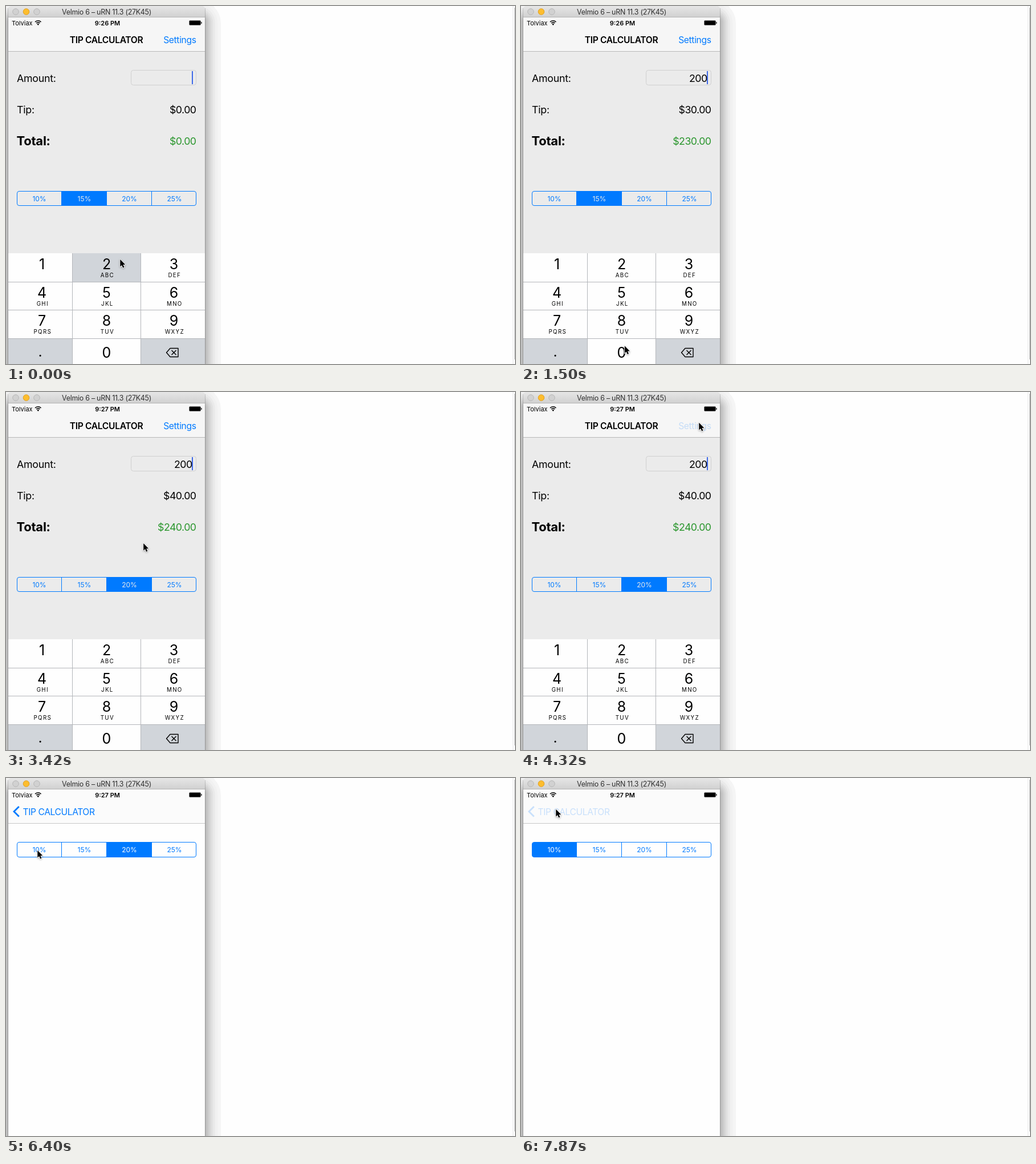
An HTML page with a canvas that plays this animation: 893 px wide and 627 px high, repeating every 8000 ms.

```html
<!DOCTYPE html>
<html lang="en">
<head>
<meta charset="utf-8">
<title>Tip calculator</title>
<style>
html, body { margin: 0; width: 100%; height: 100%; overflow: hidden; background: #fefefe; }
canvas { display: block; }
</style>
</head>
<body>
<canvas id="stage" width="893" height="627"></canvas>
<script>
const ctx = document.getElementById('stage').getContext('2d');
const LOOP = 8000, STEP = 147;
const LEFT = 4, RIGHT = 349, BLUE = '#007aff', KEY_GRAY = '#d1d5da', KEY_LINE = '#b4b6ba';
const FONT = 'Inter, "Liberation Sans", sans-serif';
const RATES = [10, 15, 20, 25];

// Pointer legs: start time, number of steps, destination.
const HOME = [199, 443];
const LEGS = [
  [150, 2, [179, 606]],
  [1500, 8, [215, 338]],
  [3270, 6, [311, 53]],
  [5660, 3, [296, 167]],
  [6100, 3, [54, 126]],
  [7290, 1, [59, 44]],
  [7580, 2, [60, 54]]
];

const between = (t, a, b) => t >= a && t < b;

function rect(x, y, w, h, color) {
  ctx.fillStyle = color;
  ctx.fillRect(x, y, w, h);
}

function roundRect(x, y, w, h, r) {
  ctx.beginPath();
  ctx.roundRect(x, y, w, h, r);
}

function text(str, x, y, size, { color = '#000', weight = 400, align = 'left', spacing = 0 } = {}) {
  ctx.font = `${weight} ${size}px ${FONT}`;
  ctx.letterSpacing = spacing + 'px';
  ctx.textAlign = align;
  ctx.fillStyle = color;
  ctx.fillText(str, x, y);
}

function polyline(points, close) {
  ctx.beginPath();
  points.forEach(([x, y]) => ctx.lineTo(x, y));
  if (close) ctx.closePath();
}

function pointerAt(t) {
  let pos = HOME;
  for (const [start, steps, goal] of LEGS) {
    if (t < start) break;
    const p = Math.min(steps, Math.floor((t - start) / STEP) + 1) / steps;
    const e = p * p * (3 - 2 * p);
    pos = pos.map((v, i) => v + (goal[i] - v) * e);
  }
  return pos;
}

function drawPointer([x, y]) {
  ctx.save();
  ctx.translate(x + 0.8, y + 0.3);
  ctx.lineJoin = 'round';
  polyline([[0.5, 0.5], [0.5, 13.3], [3.4, 10.7], [5.4, 15.3], [7.6, 14.3], [5.7, 9.8], [9.5, 9.8]], true);
  ctx.shadowColor = 'rgba(0,0,0,.35)';
  ctx.shadowBlur = 3;
  ctx.shadowOffsetY = 1;
  ctx.strokeStyle = '#fff';
  ctx.lineWidth = 1.7;
  ctx.stroke();
  ctx.shadowColor = 'transparent';
  ctx.fillStyle = '#000';
  ctx.fill();
  ctx.restore();
}

function drawDesktop() {
  rect(0, 0, 893, 627, '#fefefe');
  rect(889, 0, 1, 627, '#e8e8e8');
  rect(892, 3, 1, 616, '#b4b4b4');
  // Banded window shadow, narrower and darker towards the window.
  for (let d = 28; d > 0.5; d *= 0.8) {
    const gray = 254 - 9 - 65 * (1 - d / 28) ** 1.7;
    roundRect(LEFT - d, 18 - d, RIGHT - LEFT + 2 * d, 700, d + 12);
    ctx.fillStyle = `rgb(${gray},${gray},${gray})`;
    ctx.fill();
  }
  rect(LEFT - 1, 4, 1, 623, 'rgba(0,0,0,.16)');
  rect(RIGHT, 4, 1, 623, 'rgba(0,0,0,.16)');
}

function drawTitleBar() {
  const shade = ctx.createLinearGradient(0, 0, 0, 20);
  shade.addColorStop(0, '#e6e6e6');
  shade.addColorStop(1, '#d0d0d0');
  roundRect(LEFT, 0, RIGHT - LEFT, 20, [5, 5, 0, 0]);
  ctx.fillStyle = shade;
  ctx.fill();
  rect(LEFT, 19, RIGHT - LEFT, 1, '#b5b5b5');
  [[17, '#d1d1d1', '#b7b7b7'], [35.5, '#fdbd2e', '#dfa023'], [54, '#d1d1d1', '#b7b7b7']].forEach(([x, fill, edge]) => {
    ctx.beginPath();
    ctx.arc(x, 10, 5.3, 0, Math.PI * 2);
    ctx.fillStyle = fill;
    ctx.fill();
    ctx.strokeStyle = edge;
    ctx.lineWidth = 1;
    ctx.stroke();
  });
  text('Velmio 6 – uRN 11.3 (27K45)', 176.5, 14.7, 12.4, { color: '#303030', align: 'center', spacing: -0.25 });
}

function drawStatusBar(t) {
  text('Tolviax', 10, 33.5, 11);
  text(t < 1950 ? '9:26 PM' : '9:27 PM', 178, 33.5, 11, { weight: 600, align: 'center' });
  ctx.strokeStyle = '#000';
  ctx.lineWidth = 1.6;
  [4.2, 7.2].forEach(r => {
    ctx.beginPath();
    ctx.arc(56.3, 33, r, Math.PI * 1.24, Math.PI * 1.76);
    ctx.stroke();
  });
  ctx.fillStyle = '#000';
  ctx.beginPath();
  ctx.moveTo(56.3, 34);
  ctx.arc(56.3, 33.4, 2.4, Math.PI * 1.24, Math.PI * 1.76);
  ctx.fill();
  roundRect(321.5, 25.5, 20, 8, 1.5);
  ctx.strokeStyle = 'rgba(0,0,0,.55)';
  ctx.lineWidth = 1;
  ctx.stroke();
  rect(322, 26, 19, 7, '#000');
  roundRect(342.3, 27.8, 1.2, 3.4, 0.6);
  ctx.fill();
}

function drawSegments(x, y, h, selected, pressed, paper) {
  const w = 314, cell = 79;
  const divider = i => x - 1.5 + i * cell;
  ctx.save();
  roundRect(x, y, w, h, 3.5);
  ctx.clip();
  if (pressed >= 0) rect(divider(pressed), y, cell, h, 'rgba(0,122,255,.15)');
  rect(divider(selected), y, cell + 1, h, BLUE);
  for (let i = 1; i < 4; i++) rect(divider(i), y, 1, h, BLUE);
  ctx.restore();
  roundRect(x, y, w, h, 3.5);
  ctx.strokeStyle = BLUE;
  ctx.lineWidth = 1;
  ctx.stroke();
  RATES.forEach((rate, i) => text(rate + '%', x + 39 + i * cell, y + h / 2 + 4.6, 12,
    { color: i === selected ? paper : BLUE, align: 'center' }));
}

function drawKeypad(pressed) {
  const cols = [LEFT, 117, 237], widths = [112, 119, 112], tops = [433, 484, 533, 583], heights = [50, 48, 49, 44];
  const centers = [63, 176.5, 294.5], baselines = [461, 510.5, 560, 616];
  const letters = ['', 'ABC', 'DEF', 'GHI', 'JKL', 'MNO', 'PQRS', 'TUV', 'WXYZ'];
  rect(LEFT, 433, RIGHT - LEFT, 194, KEY_LINE);
  for (let i = 0; i < 12; i++) {
    const row = Math.floor(i / 3), col = i % 3;
    const label = i < 9 ? String(i + 1) : ['.', '0', ''][col];
    const gray = label === '.' || !label || label === pressed;
    rect(cols[col], tops[row], widths[col], heights[row], gray ? KEY_GRAY : '#fefefe');
    if (label === '.') text(label, 60, 614, 25, { align: 'center' });
    else text(label, centers[col], baselines[row], 25, { align: 'center' });
    if (letters[i]) text(letters[i], centers[col] + 1.3, baselines[row] + 14.2, 9.8, { align: 'center', spacing: 1.3 });
  }
  ctx.strokeStyle = '#000';
  ctx.lineWidth = 1.4;
  ctx.lineJoin = 'round';
  polyline([[281.5, 607], [288, 599.5], [302, 599.5], [302, 614.5], [288, 614.5]], true);
  ctx.stroke();
  polyline([[290.5, 603], [298.5, 611]]);
  ctx.stroke();
  polyline([[298.5, 603], [290.5, 611]]);
  ctx.stroke();
}

function caretAlpha(t) {
  if (t < 1650) return 1;
  const phase = (t - 2240 + 2 * 1040) % 1040;
  return phase < 440 ? 1 : phase < 590 ? 0.7 : phase < 735 ? 0.2 : 0;
}

function drawCalculator(t) {
  const paper = '#ebebeb';
  const amount = t < 150 ? '' : t < 900 ? '2' : t < 1200 ? '20' : '200';
  const choice = t < 2830 ? 1 : 2;
  const tip = amount * RATES[choice] / 100;
  const total = Number(amount) + tip;
  const money = v => '$' + v.toFixed(2);
  const body = { spacing: -0.25 };
  const right = { align: 'right', spacing: -0.55 };

  rect(LEFT, 20, RIGHT - LEFT, 59, '#f6f6f6');
  rect(LEFT, 79, RIGHT - LEFT, 1, '#b8b8b8');
  rect(LEFT, 80, RIGHT - LEFT, 353, paper);
  text('TIP CALCULATOR', 176, 64.5, 15.6, { weight: 600, align: 'center', spacing: -0.32 });
  ctx.globalAlpha = t < 4170 ? 1 : 0.2;
  text('Settings', 333.6, 64.5, 15.6, { color: BLUE, align: 'right', spacing: -0.33 });
  ctx.globalAlpha = 1;

  text('Amount:', 19, 132.5, 17.8, body);
  text('Tip:', 19, 187.5, 17.8, body);
  text('Total:', 18.5, 244.3, 22, { weight: 700, spacing: -0.25 });
  roundRect(219.5, 112.5, 114, 26, 4);
  ctx.strokeStyle = '#d0d0d0';
  ctx.lineWidth = 1;
  ctx.stroke();
  text(amount, 326.6, 132.5, 17.8, right);
  ctx.globalAlpha = caretAlpha(t);
  rect(326, 114, 2, 23, '#3f69e8');
  ctx.globalAlpha = 1;
  text(money(tip), 333.5, 187.5, 17.8, right);
  text(money(total), 333.5, 242.8, 17.8, { ...right, color: '#2a962d' });

  drawSegments(19.5, 324.5, 25, choice, between(t, 2680, 2830) ? 2 : -1, paper);
  const key = t < 150 ? '2' : between(t, 750, 900) || between(t, 1050, 1200) ? '0' : '';
  drawKeypad(key);
}

function drawSettings(t) {
  const shift = t < 5060 ? 3 : 0;
  rect(LEFT, 20, RIGHT - LEFT, 607, '#fefefe');
  rect(LEFT, 20, RIGHT - LEFT, 59, '#fbfbfb');
  rect(LEFT, 79, RIGHT - LEFT, 1, '#c8c8c8');
  if (shift) {
    // Sliver of the dimmed previous screen.
    rect(LEFT, 80, 4, 353, '#aaaaaa');
    rect(LEFT, 433, 4, 150, '#dedede');
    rect(LEFT, 583, 4, 44, '#b8bbbf');
    [483, 532, 582].forEach(y => rect(LEFT, y, 4, 1, '#9c9c9c'));
    [324, 349].forEach(y => rect(LEFT, y, 4, 1, '#35506e'));
  }
  ctx.globalAlpha = t < 7870 ? 1 : 0.2;
  ctx.strokeStyle = BLUE;
  ctx.lineWidth = 2.8;
  ctx.lineJoin = 'miter';
  polyline([[22.8, 50], [14, 58.8], [22.8, 67.6]]);
  ctx.stroke();
  text('TIP CALCULATOR', 29.5, 64.5, 15.6, { color: BLUE, spacing: -0.4 });
  ctx.globalAlpha = 1;
  drawSegments(19.5 + shift, 112.5, 26, t < 6840 ? 2 : 0, between(t, 6690, 6840) ? 0 : -1, '#fff');
}

function frame() {
  const t = performance.now() % LOOP;
  drawDesktop();
  if (t < 4910) drawCalculator(t);
  else drawSettings(t);
  drawTitleBar();
  drawStatusBar(t);
  drawPointer(pointerAt(t));
  requestAnimationFrame(frame);
}
requestAnimationFrame(frame);
</script>
</body>
</html>
```
